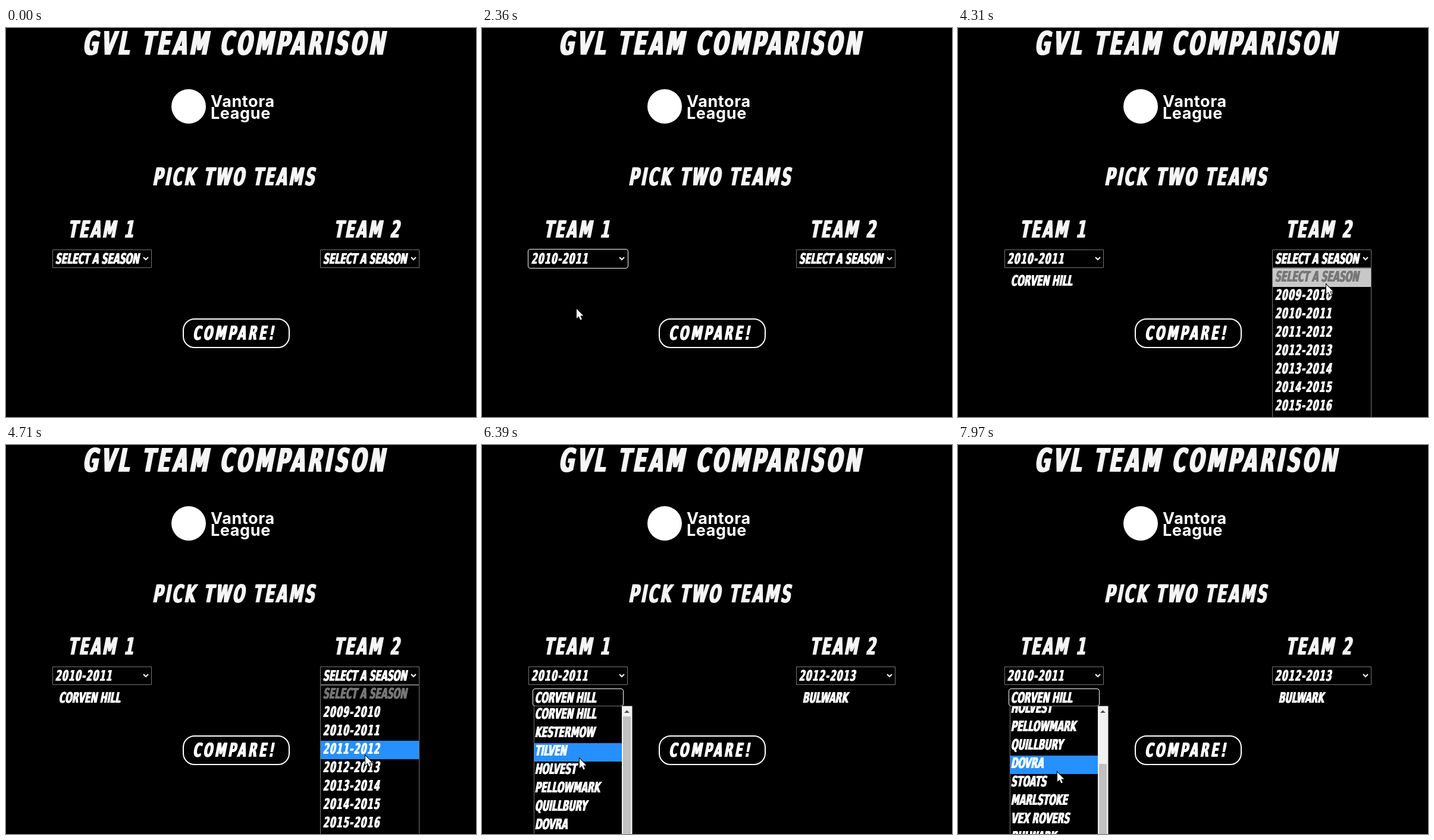
These frames come from a looping animation (790 px wide and 655 px high, 8 s). An HTML page with a canvas:

```html
<!DOCTYPE html>
<html lang="en">
<head>
<meta charset="utf-8">
<title>Team comparison</title>
<style>
  html, body { margin: 0; width: 100%; height: 100%; overflow: hidden; background: #000; }
  canvas { display: block; }
</style>
</head>
<body>
<canvas id="stage" width="790" height="655"></canvas>
<script>
const ctx = document.getElementById('stage').getContext('2d');
const LOOP = 8000, ROW = 31;
const WHITE = '#fff', SOFT = '#f5f5f5', GREY = '#767676', BLUE = '#2690ff';
const CONDENSE = 0.56, SLANT = 0.19;

const seasons = ['SELECT A SEASON',
  ...Array.from({ length: 8 }, (_, i) => `${2009 + i}-${2010 + i}`)];
const teams = ['CORVEN HILL', 'KESTERMOW', 'TILVEN', 'HOLVEST', 'PELLOWMARK', 'QUILLBURY',
  'DOVRA', 'STOATS', 'MARLSTOKE', 'VEX ROVERS', 'BULWARK'];

// Pointer strokes from one resting place to the next
const strokes = [
  { from: 60, to: 830, x: 180, y: 392 },
  { from: 1210, to: 1720, x: 159, y: 473 },
  { from: 3253, to: 3780, x: 626, y: 387 },
  { from: 4190, to: 4920, x: 602, y: 535 },
  { from: 5306, to: 5830, x: 140, y: 422 },
  { from: 6000, to: 6690, x: 169, y: 552 },
  { from: 7760, to: 7970, x: 167, y: 551 }
];

const clamp = (v, low, high) => Math.min(high, Math.max(low, v));
const easeOut = (t, from, to) => 1 - (1 - clamp((t - from) / (to - from), 0, 1)) ** 2;

function pointerAt(t) {
  let x = 622, y = 615;
  for (const s of strokes) {
    const u = easeOut(t, s.from, s.to);
    x += (s.x - x) * u;
    y += (s.y - y) * u;
  }
  return { x: Math.round(x), y: Math.round(y) };
}

// Condensed, slanted, extra heavy comic lettering
function lettering(text, x, y, size, spacing = 0, color = WHITE) {
  ctx.save();
  ctx.transform(CONDENSE, 0, -SLANT, 1, x, y);
  ctx.font = `bold ${size}px "DejaVu Sans", sans-serif`;
  ctx.letterSpacing = `${spacing / CONDENSE}px`;
  ctx.fillStyle = color;
  for (let i = 0; i < 3; i++) ctx.fillText(text, size * 0.045 * i, 0);
  ctx.restore();
}

const option = (text, x, y, color) =>
  lettering(text, x, y, 24.7, /\d/.test(text) ? 1.5 : 0, color);

function fill(color, x, y, w, h) {
  ctx.fillStyle = color;
  ctx.fillRect(x, y, w, h);
}

function outline(x, y, w, h, radius, color, width = 1) {
  ctx.strokeStyle = color;
  ctx.lineWidth = width;
  ctx.beginPath();
  ctx.roundRect(x, y, w, h, radius);
  ctx.stroke();
}

function seasonSelect(x, value, focused) {
  if (focused) outline(x - 0.5, 372.5, 168, 32, 3.5, WHITE);
  else outline(x + 0.5, 373.5, 166, 30, 0, GREY);
  option(value, x + 4, 397);
  ctx.strokeStyle = WHITE;
  ctx.lineWidth = 2;
  ctx.stroke(new Path2D(`M${x + 153} 386l4 4l4 -4`));
}

function seasonList(x, pointer) {
  const hover = Math.floor((pointer.y - 405) / ROW);
  seasons.forEach((name, i) => {
    const top = 405 + ROW * i;
    if (i === hover) fill(i ? BLUE : '#c8c8c8', x + 1, top, 165, ROW);
    option(name, x + 4, top + 22, i ? WHITE : GREY);
  });
  outline(x + 0.5, 404.5, 166, 300, 0, GREY);
}

function teamList(t, pointer) {
  const scroll = Math.round(103 * easeOut(t, 6905, 7265));
  // The highlighted row only follows the pointer once scrolling has settled.
  const settled = t < 7290 ? 0 : scroll;
  const hover = Math.max(0, Math.floor((pointer.y - 440 + settled) / ROW));
  ctx.save();
  ctx.beginPath();
  ctx.rect(87, 440, 166, 215);
  ctx.clip();
  teams.forEach((name, i) => {
    const top = 440 + ROW * i - scroll;
    if (i === hover) fill(BLUE, 88, top, 147, ROW);
    option(name, 88, top + 21);
  });
  fill('#f1f1f1', 235, 440, 17, 215);
  fill('#c1c1c1', 237, Math.round(457 + scroll * 0.78), 13, 300);
  ctx.fillStyle = '#505050';
  ctx.fill(new Path2D('M239 451l4.5 -4.5l4.5 4.5z'));
  ctx.restore();
  outline(87.5, 439.5, 165, 300, 0, GREY);
}

const arrow = new Path2D('M0 0V16L3.7 12.6L6.4 18.6L8.9 17.5L6.3 11.6H11.3Z');

function drawPointer({ x, y }) {
  ctx.save();
  ctx.translate(x, y);
  ctx.strokeStyle = '#000';
  ctx.lineWidth = 2;
  ctx.stroke(arrow);
  ctx.fillStyle = WHITE;
  ctx.fill(arrow);
  ctx.restore();
}

function header() {
  lettering('GVL TEAM COMPARISON', 127, 45, 54.9, 4.9, SOFT);
  ctx.fillStyle = WHITE;
  ctx.beginPath();
  ctx.arc(307, 132, 29, 0, Math.PI * 2);
  ctx.fill();
  ctx.font = '700 27px Inter, sans-serif';
  ctx.letterSpacing = '0.6px';
  ctx.fillText('Vantora', 344, 133);
  ctx.fillText('League', 344, 153);
  lettering('PICK TWO TEAMS', 245, 265, 41.5, 3.4, SOFT);
  lettering('TEAM 1', 103, 353, 40, 3.2, SOFT);
  lettering('TEAM 2', 550, 353, 40, 3.2, SOFT);
}

function draw(t) {
  const during = (from, to = LOOP) => t >= from && t < to;
  const pointer = pointerAt(t);
  fill('#000', 0, 0, 790, 655);
  header();

  seasonSelect(78, seasons[t < 2360 ? 0 : 2], during(2360, 3940));
  seasonSelect(528, seasons[t < 5120 ? 0 : 4], during(5120, 5960));
  outline(298, 490, 178, 48, 19, WHITE, 2);
  lettering('COMPARE!', 313, 525, 32.5, 4, WHITE);

  if (during(2690)) option('CORVEN HILL', 88, 434);
  if (during(5330)) option('BULWARK', 538, 434);
  if (during(960, 2360)) seasonList(78, pointer);
  if (during(3940, 5120)) seasonList(528, pointer);
  if (during(5960)) {
    outline(85.5, 410.5, 152, 29, 3.5, WHITE);
    teamList(t, pointer);
  }
  if (during(60)) drawPointer(pointer);
}

const start = performance.now();
function tick() {
  draw((performance.now() - start) % LOOP);
  requestAnimationFrame(tick);
}
tick();
</script>
</body>
</html>
```
